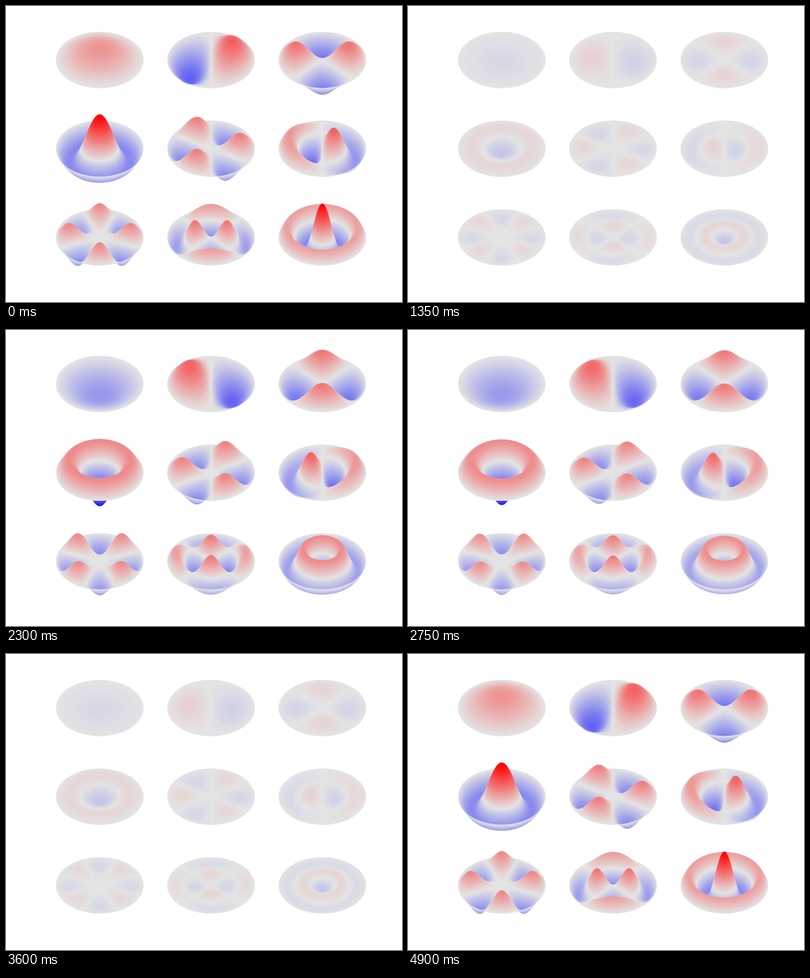
Recreate the animation shown at these times as a matplotlib script. Size 700 px wide and 525 px high, loop 4.95 s.

```python
"""Nine vibration modes of a circular drum, seen obliquely from above."""
from functools import lru_cache

import matplotlib.pyplot as plt
import numpy as np
from matplotlib.animation import FuncAnimation

WIDTH, HEIGHT, DPI = 700, 525, 100
FRAMES, INTERVAL = 99, 50
SS = 2                                # supersampling per axis
RADIUS = 77.4                         # drum radius in pixels
ELEV = np.radians(40)
LEFT, TOP = 165.7, 95.8               # centre of the first drum
STEP_X, STEP_Y = 196.75, 157.3

# angular order, zero of the Bessel function, amplitude
MODES = [
    (0, 2.4048, 0.35), (1, 3.8317, 1), (2, 5.1356, 1),
    (0, 5.5201, 1), (3, 6.3802, 1), (1, 7.0156, 1),
    (4, 7.5883, 1), (2, 8.4172, 1), (0, 8.6537, 1),
]


def bessel(n, x):
    """J_n(x) from its integral form, midpoint rule."""
    taus = (np.arange(40) + 0.5) * np.pi / 40
    return sum(np.cos(n * tau - x * np.sin(tau)) for tau in taus) / 40


def color_table():
    """Level 0 is the background, 1 to 255 run blue, grey, red."""
    z = (np.arange(256) - 128) / 127
    ends = np.where(z[:, None] < 0, [0, 0, 255], [255, 0, 0])
    mix = np.abs(z)[:, None].clip(0, 1)
    table = 228 * (1 - mix) + ends * mix
    table[0] = 255
    return table.round().astype(np.uint16)


def build_drum(i, n, zero, amp):
    """Sample one drum column by column, back to front."""
    cx, cy = LEFT + STEP_X * (i % 3), TOP + STEP_Y * (i // 3)
    cols = np.arange(int((cx - RADIUS) * SS) - 1, int((cx + RADIUS) * SS) + 2)
    x = ((cols + 0.5) / SS - cx) / RADIUS
    cols, x = cols[np.abs(x) < 1], x[np.abs(x) < 1]
    y = np.linspace(1, -1, int(170 * zero))[:, None] * np.sqrt(1 - x * x)

    radii = np.linspace(0, 1, 2000)
    profile = amp * bessel(n, zero * radii)
    z = np.interp(np.hypot(x, y), radii, profile) * np.cos(n * np.arctan2(y, x))

    flat = SS * (cy - RADIUS * np.sin(ELEV) * y)
    lift = SS * RADIUS * np.cos(ELEV) * z
    cols = np.broadcast_to(cols, z.shape).astype(np.int32)
    return flat.astype(np.float32), lift.astype(np.float32), z.astype(np.float32), cols


DRUMS = [build_drum(i, *mode) for i, mode in enumerate(MODES)]
TABLE = color_table()


@lru_cache(maxsize=None)
def render(step):
    swing = np.float32(np.cos(2 * np.pi * step / FRAMES))
    levels = np.zeros((HEIGHT * SS, WIDTH * SS), np.uint8)
    pixels = levels.ravel()
    for flat, lift, z, cols in DRUMS:
        rows = (flat - swing * lift).astype(np.int32)
        # nearer samples come later and cover those behind
        pixels[(rows * (WIDTH * SS) + cols).ravel()] = (
            128.5 + 127 * swing * z).astype(np.uint8).ravel()
    total = sum(TABLE[levels[a::SS, b::SS]] for a in range(SS) for b in range(SS))
    return (total // SS**2).astype(np.uint8)


fig = plt.figure(figsize=(WIDTH / DPI, HEIGHT / DPI), dpi=DPI, facecolor="white")
ax = fig.add_axes([0, 0, 1, 1])
ax.axis("off")
picture = ax.imshow(render(0), interpolation="nearest", aspect="auto")


def update(frame):
    # the swing back mirrors the swing out
    picture.set_data(render(min(frame, FRAMES - frame)))
    return (picture,)


anim = FuncAnimation(fig, update, frames=FRAMES, interval=INTERVAL,
                     repeat=True, repeat_delay=0)
plt.show()
```
